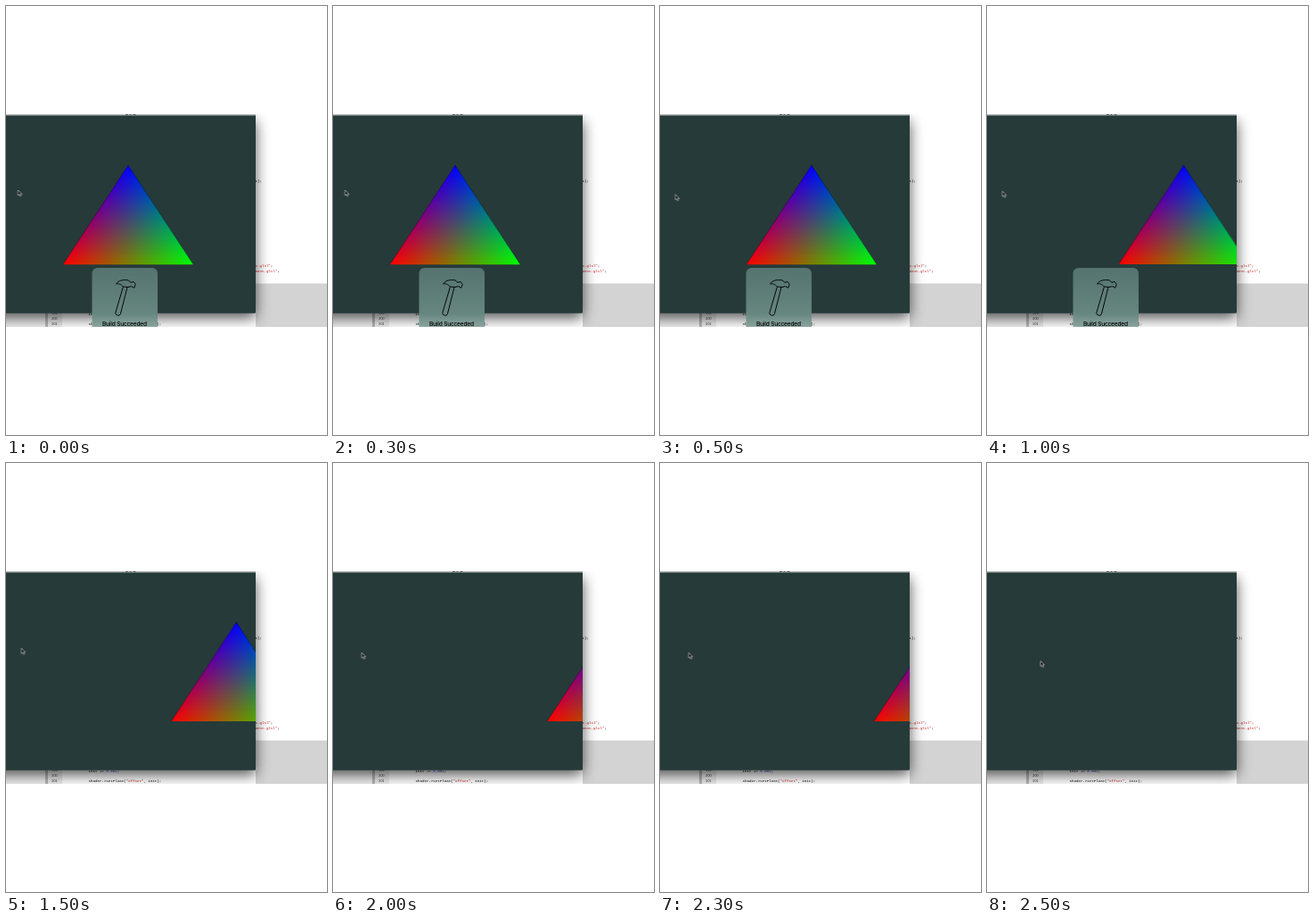
Write an HTML page that moves like this. It is 360 by 480 pixels and loops after 3 s.

```html
<!DOCTYPE html>
<html lang="en">
<head>
<meta charset="utf-8">
<title>Moving triangle</title>
<style>
  html, body { margin: 0; width: 100%; height: 100%; overflow: hidden; background: #fff; }
  svg { display: block; width: 360px; height: 480px; }
  .code { font: 4.13px "Liberation Mono", "DejaVu Sans Mono", monospace; white-space: pre; }
  .num { font: 3.7px "Liberation Sans", sans-serif; fill: #333; text-anchor: end; }
  .red { fill: #c81c1c; }
  .blue { fill: #2a20d0; }
  .label { font: 500 6.6px Inter, "Liberation Sans", sans-serif; text-anchor: middle; }
  .blend { isolation: isolate; }
  .blend polygon { mix-blend-mode: screen; }
</style>
</head>
<body>
<svg viewBox="0 0 360 480">
  <defs>
    <clipPath id="screen"><rect y="121" width="360" height="238"/></clipPath>
    <clipPath id="view"><rect y="123" width="279.7" height="220.5"/></clipPath>
    <filter id="blur" filterUnits="userSpaceOnUse" x="-60" y="80" width="420" height="330">
      <feGaussianBlur stdDeviation="8"/>
    </filter>
    <g id="gradients"></g>
    <linearGradient id="panel" x2="0" y2="1">
      <stop stop-color="#55736f"/>
      <stop offset=".7" stop-color="#66867f"/>
      <stop offset="1" stop-color="#9bb1ad"/>
    </linearGradient>
  </defs>

  <g clip-path="url(#screen)">
    <!-- editor behind the window -->
    <rect y="121" width="360" height="238" fill="#fff"/>
    <rect x="280" y="310.5" width="80" height="49" fill="#d3d3d3"/>
    <rect y="340" width="44" height="19" fill="#eee"/>
    <rect x="44" y="340" width="3" height="19" fill="#b4b4b4"/>
    <rect x="47" y="340" width="16" height="19" fill="#ececec"/>
    <g class="num">
      <text x="57.5" y="345.4">199</text>
      <text x="57.5" y="351.2">200</text>
      <text x="57.5" y="357">201</text>
    </g>
    <g class="code">
      <text x="92.5" y="346">init += <tspan class="blue">0.001</tspan>;</text>
      <text x="92.5" y="357">shader-&gt;setFloat(<tspan class="red">"offset"</tspan>, init);</text>
      <text x="279.5" y="196.5">1);</text>
      <text x="279.5" y="291.5"><tspan class="red">x.glsl"</tspan>;</text>
      <text x="279.5" y="297.5"><tspan class="red">ment.glsl"</tspan>;</text>
    </g>

    <!-- render window -->
    <rect x="-40" y="129" width="320" height="220" opacity=".68" filter="url(#blur)"/>
    <rect y="121" width="280" height="2" fill="#b9bcbc"/>
    <path d="M134 121.5h3m1.5 0h2m2 0h3" stroke="#555" stroke-width=".9"/>
    <path d="M0 122.6H280V342.5Q280 343.8 278.7 343.8H0Z" fill="#263a39"/>
    <g clip-path="url(#view)">
      <g id="triangle" class="blend"></g>
    </g>
    <path id="cursor" d="M0 0V6L1.4 4.8L2.4 7L3.5 6.5L2.5 4.4H4.4Z"
      fill="#111" stroke="#ddd" stroke-width=".6"/>

    <!-- build notice -->
    <g id="notice">
      <rect x="96.5" y="293" width="73.5" height="73" rx="6" fill="url(#panel)"/>
      <g fill="none" stroke="#050808" stroke-width="1" stroke-linejoin="round">
        <path d="M123.6 311C126 307 131 306 137 306.8L140 309.4L143 308.4L145.3 311.4L143.8 315.3L140.4 313.6L137 314.6L131.2 314C129 311 126 310.4 123.6 311Z"/>
        <path d="M131.4 314.2L122.8 343.4Q122.6 345.4 125.2 346.2Q127.8 346.8 128.4 344.6L136 314.8"/>
      </g>
      <text class="label" x="133" y="358.2" textLength="50">Build Succeeded</text>
    </g>
  </g>
</svg>
<script>
  const STEP = 500;
  const TRIANGLE_X = [64, 97, 147.5, 185.3, 240, 290];
  const CURSOR = [[13.5, 206], [17.3, 210.8], [17.3, 207.2], [17.3, 207.2], [32.2, 212.2], [60, 221.5]];
  const NOTICE = [1, 1, 1, 0, 0, 0];

  const $ = id => document.getElementById(id);
  const make = (parent, name, attrs) => {
    const el = document.createElementNS("http://www.w3.org/2000/svg", name);
    for (const key in attrs) el.setAttribute(key, attrs[key]);
    return parent.appendChild(el);
  };

  // One gradient per corner, fading to black on the opposite side.
  const corners = [[73, 0, "#00f"], [0, 111, "#f00"], [146, 111, "#0f0"]];
  const points = corners.map(([x, y]) => x + "," + y).join(" ");
  corners.forEach(([x, y, color], i) => {
    const [bx, by] = corners[(i + 1) % 3], [cx, cy] = corners[(i + 2) % 3];
    const dx = cx - bx, dy = cy - by;
    const t = ((x - bx) * dx + (y - by) * dy) / (dx * dx + dy * dy);
    const grad = make($("gradients"), "linearGradient", {
      id: "corner" + i, gradientUnits: "userSpaceOnUse",
      x1: x, y1: y, x2: bx + t * dx, y2: by + t * dy
    });
    make(grad, "stop", { offset: 0, "stop-color": color });
    make(grad, "stop", { offset: 1, "stop-color": "#000" });
    make($("triangle"), "polygon", { points, fill: `url(#corner${i})` });
  });

  // Hold each value for one step, then jump.
  const hold = (id, prop, values) => {
    const frames = [...values, values.at(-1)].map((value, i) => ({
      [prop]: value, offset: i / values.length, easing: "steps(1, end)"
    }));
    const anim = $(id).animate(frames, { duration: STEP * values.length, iterations: Infinity });
    anim.startTime = 0;
  };
  const move = (x, y) => `translate(${x}px, ${y}px)`;

  hold("triangle", "transform", TRIANGLE_X.map(x => move(x, 178.3)));
  hold("cursor", "transform", CURSOR.map(([x, y]) => move(x, y)));
  hold("notice", "opacity", NOTICE);
</script>
</body>
</html>
```
